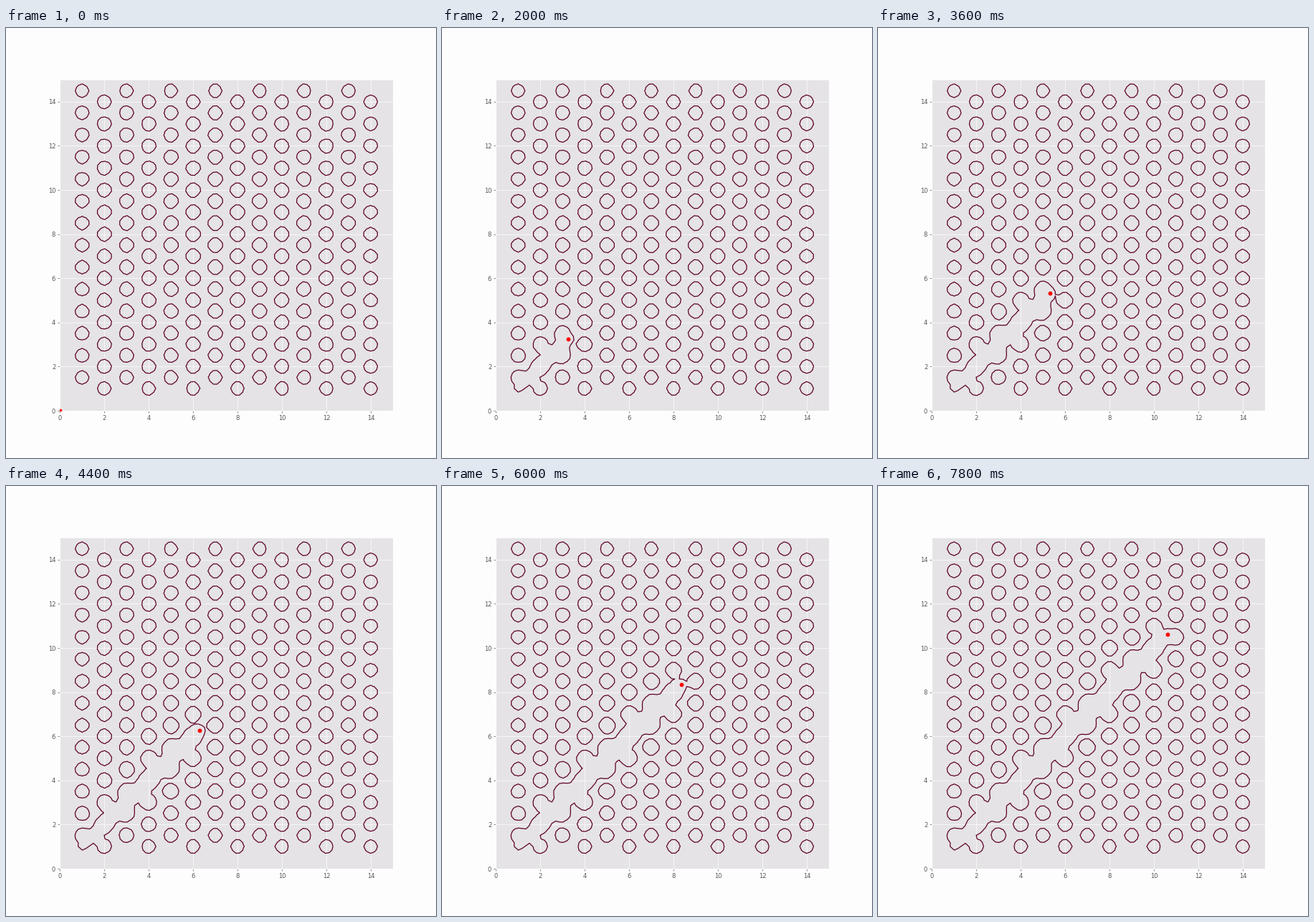
Write a matplotlib script that moves like this. It is 600 px wide and 600 px high and loops after 8 s.

```python
import numpy as np
import matplotlib.pyplot as plt
from matplotlib.animation import FuncAnimation

SIZE = 15
LEVEL = 30.5
TRAIL_WEIGHT = 0.44
PAPER, PANEL, GRID = "#fefdfe", "#e5e3e6", "#ffffff"
LINE, TICK = "#5e0028", "#555555"

axis = np.linspace(0, SIZE, 90)
X, Y = np.meshgrid(axis, axis)


def pull(x, y, power):
    """Field of one point on the grid, falling off as distance**-power."""
    return np.maximum(np.hypot(X - x, Y - y), 0.01) ** -power


# Staggered lattice: odd columns sit half a unit higher.
lattice = sum(pull(x, y + 0.5 * (x % 2), 2.5)
              for x in range(1, SIZE) for y in range(1, SIZE))
path = np.linspace(1, SIZE - 1, 70)

fields = [lattice]
for p in path:
    fields.append(fields[-1] + TRAIL_WEIGHT * pull(p, p, 2))

fig = plt.figure(figsize=(10, 10), dpi=60, facecolor=PAPER)
ax = fig.add_axes([0.125, 0.11, 0.775, 0.77], facecolor=PANEL)
ax.set(xlim=(0, SIZE), ylim=(0, SIZE),
       xticks=range(0, SIZE, 2), yticks=range(0, SIZE, 2))
ax.set_axisbelow(True)
ax.grid(color=GRID, linestyle="-", linewidth=0.8)
ax.tick_params(color=TICK, labelcolor=TICK, labelsize=10)
for spine in ax.spines.values():
    spine.set(color=PAPER, linewidth=1)

dot, = ax.plot([0], [0], "o", color="red", markersize=6, zorder=5)
outline = None


def draw(i):
    global outline
    if outline is not None:
        outline.remove()
    step = 2 * i // 3  # one step every 150 ms on a 100 ms clock
    outline = ax.contour(X, Y, fields[step], levels=[LEVEL],
                         colors=[LINE], linewidths=1.5, zorder=3)
    at = path[step - 1] if step else 0
    dot.set_data([at], [at])
    return [dot]


anim = FuncAnimation(fig, draw, frames=80, interval=100,
                     init_func=lambda: [dot], repeat=True, repeat_delay=0)
plt.show()
```
